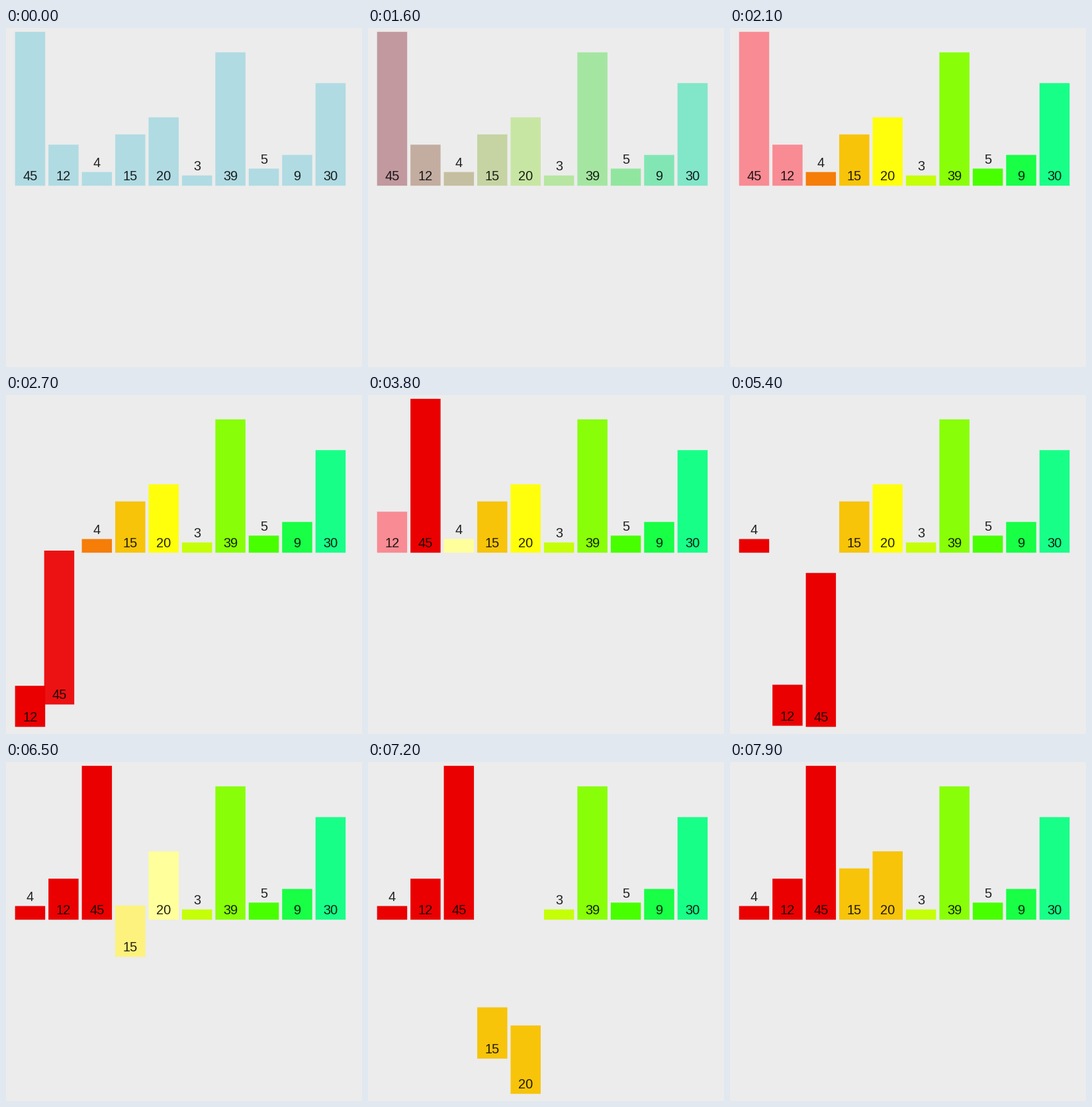
A matplotlib script that plays this animation: 538 by 512 pixels, repeating every 8 s.

```python
import numpy as np
import matplotlib.pyplot as plt
from matplotlib.animation import FuncAnimation
from matplotlib.patches import Rectangle

W, H, DPI = 538, 512, 100
FRAMES, INTERVAL = 80, 100

LEFT, PITCH, BAR_W = 13.7, 50.45, 45.5
BASE, DROP, UNIT = 238.2, 263, 5.165
FONT_PX = 20

# Merge steps start every PERIOD ms and ease over DURATION ms.
START, PERIOD, DURATION = 1522, 350.6, 185

VALUES = [45, 12, 4, 15, 20, 3, 39, 5, 9, 30]
BLUE = (176, 219, 227)
RAINBOW = [(234, 0, 0), (240, 64, 8), (245, 125, 8), (247, 196, 10),
           (255, 255, 12), (196, 255, 8), (136, 255, 8), (72, 255, 0),
           (24, 255, 70), (24, 255, 136)]
PINK, PALE = (248, 139, 148), (255, 255, 156)


def highlight(slot):
    return PINK if slot < 2 else PALE


def build_steps():
    """Every step holds one row (slot, depth, r, g, b) per bar."""
    n = len(VALUES)
    state = np.array([(i, 0, *BLUE) for i in range(n)], float)
    steps = [state.copy()]
    order = list(range(n))

    def push():
        steps.append(state.copy())

    def merge(lo, mid, hi):
        a, b = order[lo:mid], order[mid:hi]
        merged = []
        for bar in (a[0], b[0]):
            state[bar, 2:] = highlight(state[bar, 0])
        push()
        while a or b:
            take_left = not b or (a and VALUES[a[0]] <= VALUES[b[0]])
            bar = (a if take_left else b).pop(0)
            state[bar] = (lo + len(merged), 1, *RAINBOW[lo])
            merged.append(bar)
            push()
        for bar in merged:
            state[bar, 1] = 0
            push()
        order[lo:hi] = merged

    state[:, 2:] = RAINBOW
    push()
    merge(0, 1, 2)
    merge(0, 2, 3)
    merge(3, 4, 5)
    return steps


def ease(t):
    t = min(max(t, 0), 1)
    return 4 * t ** 3 if t < 0.5 else 1 - 4 * (1 - t) ** 3


def state_at(ms):
    if ms < START:
        return STEPS[0]
    k = int((ms - START) // PERIOD)
    if k >= len(STEPS) - 1:
        return STEPS[-1]
    p = ease((ms - START - k * PERIOD) / DURATION)
    return STEPS[k] * (1 - p) + STEPS[k + 1] * p


STEPS = build_steps()

fig = plt.figure(figsize=(W / DPI, H / DPI), dpi=DPI, facecolor="#ececec")
ax = fig.add_axes([0, 0, 1, 1])
ax.set_xlim(0, W)
ax.set_ylim(H, 0)
ax.axis("off")

bars, labels = [], []
for i, value in enumerate(VALUES):
    bar = Rectangle((0, 0), BAR_W, value * UNIT, linewidth=0,
                    snap=False, zorder=2 + i)
    bars.append(ax.add_patch(bar))
    labels.append(ax.text(0, 0, str(value), ha="center", va="baseline",
                          family="Liberation Sans", size=FONT_PX * 72 / DPI,
                          color="black", alpha=0.86, zorder=20))


def draw(frame):
    for value, bar, label, row in zip(VALUES, bars, labels,
                                      state_at(frame * INTERVAL)):
        slot, depth = row[:2]
        x = LEFT + PITCH * slot
        bottom = BASE + DROP * depth
        top = bottom - value * UNIT
        bar.set_xy((x, top))
        bar.set_facecolor(row[2:] / 255)
        inside = value * UNIT > 30
        label.set_position((x + BAR_W / 2,
                            bottom - 8 if inside else top - 7.5))
    return bars + labels


anim = FuncAnimation(fig, draw, frames=FRAMES, init_func=lambda: draw(0),
                     interval=INTERVAL, repeat=True, repeat_delay=0)
plt.show()
```
